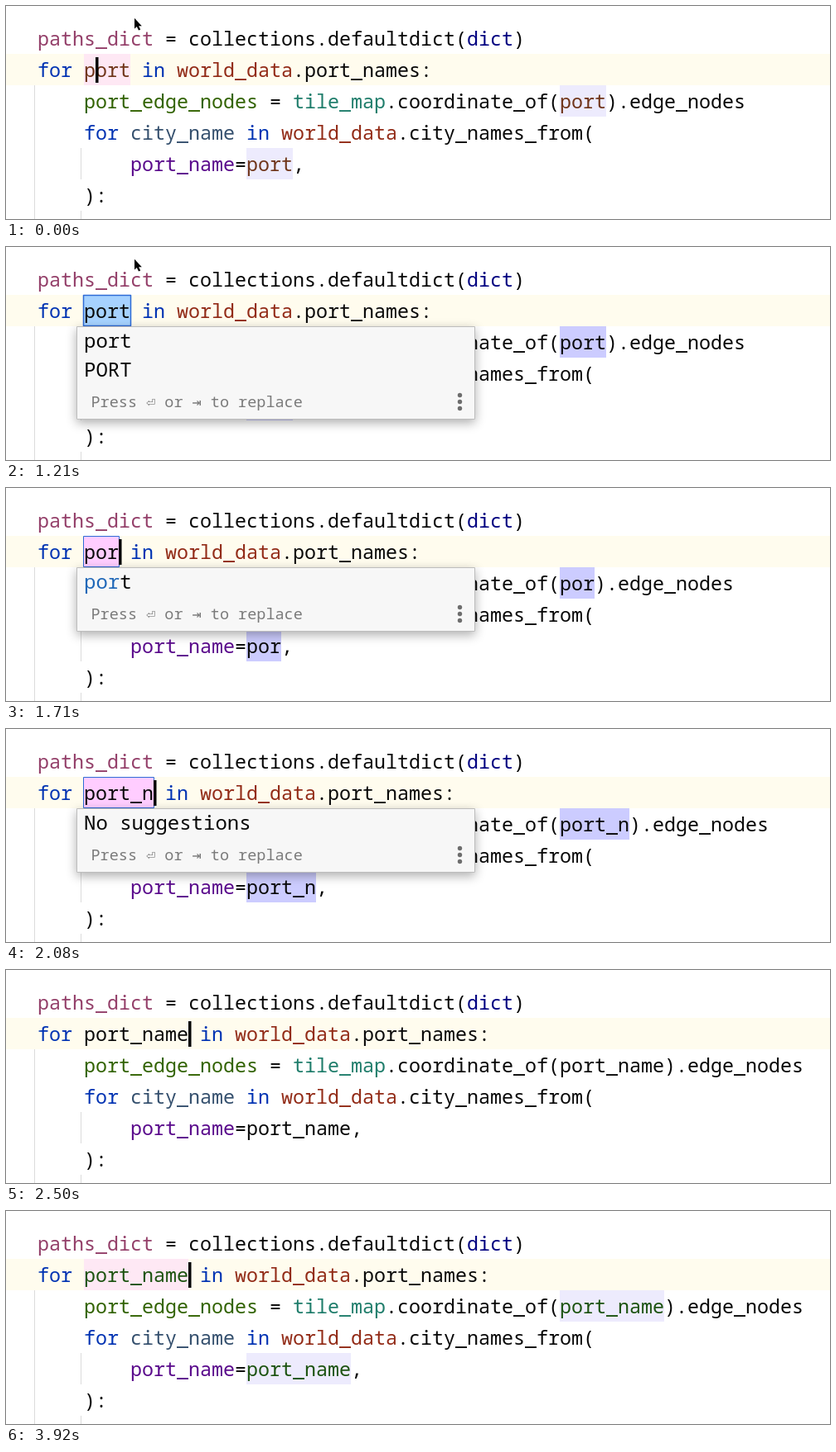
An HTML page with a canvas for the animation above (4040 ms loop, 994 by 258 pixels).

```html
<!DOCTYPE html>
<html lang="en">
<head>
<meta charset="utf-8">
<title>Rename variable</title>
<style>
html, body { margin: 0; width: 100%; height: 100%; overflow: hidden; background: #fff; }
canvas { display: block; width: 994px; height: 258px; }
</style>
</head>
<body>
<canvas id="stage" width="994" height="258"></canvas>
<script>
const LOOP = 4040;
const ctx = document.getElementById('stage').getContext('2d');
const MONO = '"Noto Sans Mono", "DejaVu Sans Mono", monospace';
const SYMBOLS = '"DejaVu Sans Mono", monospace';

// Editor grid
const LEFT = 38, CELL = 14, LINE = 38, TOP = 20, BASE = 28;

const INK = '#080808', KEYWORD = '#0033b3', DATA = '#922b17';
const BROWN = '#70351a', GREEN = '#1c5310';

const START = 830, POPUP = 880, DONE = 2420, SETTLED = 2750;
const KEYS = [1540, 1630, 1710, 1790, 1920, 2080, 2170, 2250, 2330];
const CARET_OFF = [[500, 790], [1210, 1540], [3580, 3920]];

const colX = col => LEFT + col * CELL;
const lineY = n => TOP + n * LINE;
const within = (t, a, b) => t >= a && t < b;

// Font whose character advance equals the given number of pixels
function fontFor(family, advance) {
  ctx.font = `100px ${family}`;
  return `${advance * 100 / ctx.measureText('n').width}px ${family}`;
}
const CODE = fontFor(MONO, CELL);
const ITEM = fontFor(MONO, 14.4);
const HINT = fontFor(MONO, 11.1);
const HINT_SYMBOL = fontFor(SYMBOLS, 11.1);

function rect(x, y, w, h, color) {
  ctx.fillStyle = color;
  ctx.fillRect(x, y, w, h);
}

function text(str, x, y, color, font) {
  ctx.font = font;
  ctx.fillStyle = color;
  ctx.fillText(str, x, y);
}

function codeLine(n, col, parts) {
  for (const [str, color = INK] of parts) {
    text(str, colX(col), lineY(n) + BASE, color, CODE);
    col += str.length;
  }
}

function stateAt(t) {
  const typed = KEYS.filter(k => t >= k).length;
  const template = within(t, START, DONE);
  let color = INK;
  if (t < START) color = BROWN;
  else if (t >= SETTLED) color = GREEN;
  return {
    typed, template, color,
    name: typed ? 'port_name'.slice(0, typed) : 'port',
    marked: t < START || t >= SETTLED,
    popup: within(t, POPUP, DONE),
    caret: !CARET_OFF.some(([a, b]) => within(t, a, b)),
    mouse: t < KEYS[0]
  };
}

function drawGuides() {
  rect(34, 96, 1, 162, '#dcdcdc');
  rect(90, 172, 1, 38, '#dcdcdc');
  rect(90, 248, 1, 10, '#dcdcdc');
}

function drawHighlights(s) {
  const w = s.name.length * CELL;
  if (s.template) {
    rect(colX(45), lineY(2), w, LINE, '#ccccff');
    rect(colX(18), lineY(4), w, LINE, '#ccccff');
    rect(colX(4), lineY(1), w, LINE, s.typed ? '#ffcdff' : '#a6d2ff');
    ctx.strokeStyle = '#2f6bd6';
    ctx.lineWidth = s.typed ? 1 : 1.5;
    ctx.strokeRect(colX(4) - 0.5, lineY(1) + 0.5, w + 1, LINE - 1);
  } else if (s.marked) {
    rect(colX(45), lineY(2), w, LINE, '#edebfd');
    rect(colX(18), lineY(4), w, LINE, '#edebfd');
    rect(colX(4), lineY(1), w, LINE, '#fee8f4');
  }
}

function drawCode(s) {
  const name = [s.name, s.color];
  codeLine(0, 0, [['paths_dict', '#94406a'], [' = collections.defaultdict('], ['dict', '#000080'], [')']]);
  codeLine(1, 0, [['for ', KEYWORD], name, [' in ', KEYWORD], ['world_data', DATA], ['.port_names:']]);
  codeLine(2, 4, [['port_edge_nodes', '#326300'], [' = '], ['tile_map', '#1f7d6b'],
    ['.coordinate_of('], name, [').edge_nodes']]);
  codeLine(3, 4, [['for ', KEYWORD], ['city_name', '#35506e'], [' in ', KEYWORD],
    ['world_data', DATA], ['.city_names_from(']]);
  codeLine(4, 8, [['port_name', '#5a0a8c'], ['='], name, [',']]);
  codeLine(5, 4, [['):']]);
}

function drawCaret(s) {
  const col = s.typed ? 4 + s.typed : 5;
  rect(colX(col), 62, 3.5, 31, '#000');
}

function drawHint(y) {
  const put = (str, col, font) => text(str, 102.5 + col * 11.1, y, '#7a7a7a', font);
  put('Press', 0, HINT);
  put('⏎', 6, HINT_SYMBOL);
  put('or', 8, HINT);
  put('⇥', 11, HINT_SYMBOL);
  put('to replace', 13, HINT);
}

function drawPopup(s) {
  const x = 85, y = 96, w = 481, h = s.typed ? 78 : 113;
  ctx.save();
  ctx.shadowColor = 'rgba(0,0,0,0.32)';
  ctx.shadowBlur = 12;
  ctx.shadowOffsetY = 4;
  rect(x, y, w, h, '#f7f7f7');
  ctx.restore();
  ctx.strokeStyle = '#bdbdbd';
  ctx.lineWidth = 1;
  ctx.strokeRect(x + 0.5, y + 0.5, w - 1, h - 1);

  if (s.typed > 4) {
    text('No suggestions', 94, 122, INK, ITEM);
  } else {
    const match = 'port'.slice(0, s.typed);
    text(match, 94, 122, '#2068b8', ITEM);
    text('port'.slice(s.typed), 94 + s.typed * 14.4, 122, INK, ITEM);
    if (!s.typed) text('PORT', 94, 157, INK, ITEM);
  }

  drawHint(y + h - 15);
  ctx.fillStyle = '#6e6e6e';
  for (const dy of [-8, 0, 8]) {
    ctx.beginPath();
    ctx.arc(547.5, y + h - 21.5 + dy, 2.7, 0, Math.PI * 2);
    ctx.fill();
  }
}

function drawMouse() {
  const path = new Path2D('M155 14.8V27.6L157.8 25L160 29.6L162.2 28.6L160.1 24.2H163.8Z');
  ctx.lineJoin = 'round';
  ctx.lineWidth = 2;
  ctx.strokeStyle = '#fff';
  ctx.stroke(path);
  ctx.fillStyle = '#000';
  ctx.fill(path);
}

function draw(t) {
  const s = stateAt(t);
  rect(0, 0, 994, 258, '#fff');
  rect(0, lineY(1), 994, LINE, '#fffcee');
  drawGuides();
  drawHighlights(s);
  drawCode(s);
  if (s.caret) drawCaret(s);
  if (s.popup) drawPopup(s);
  if (s.mouse) drawMouse();
}

const begin = performance.now();
function tick() {
  draw((performance.now() - begin) % LOOP);
  requestAnimationFrame(tick);
}
tick();
</script>
</body>
</html>
```
